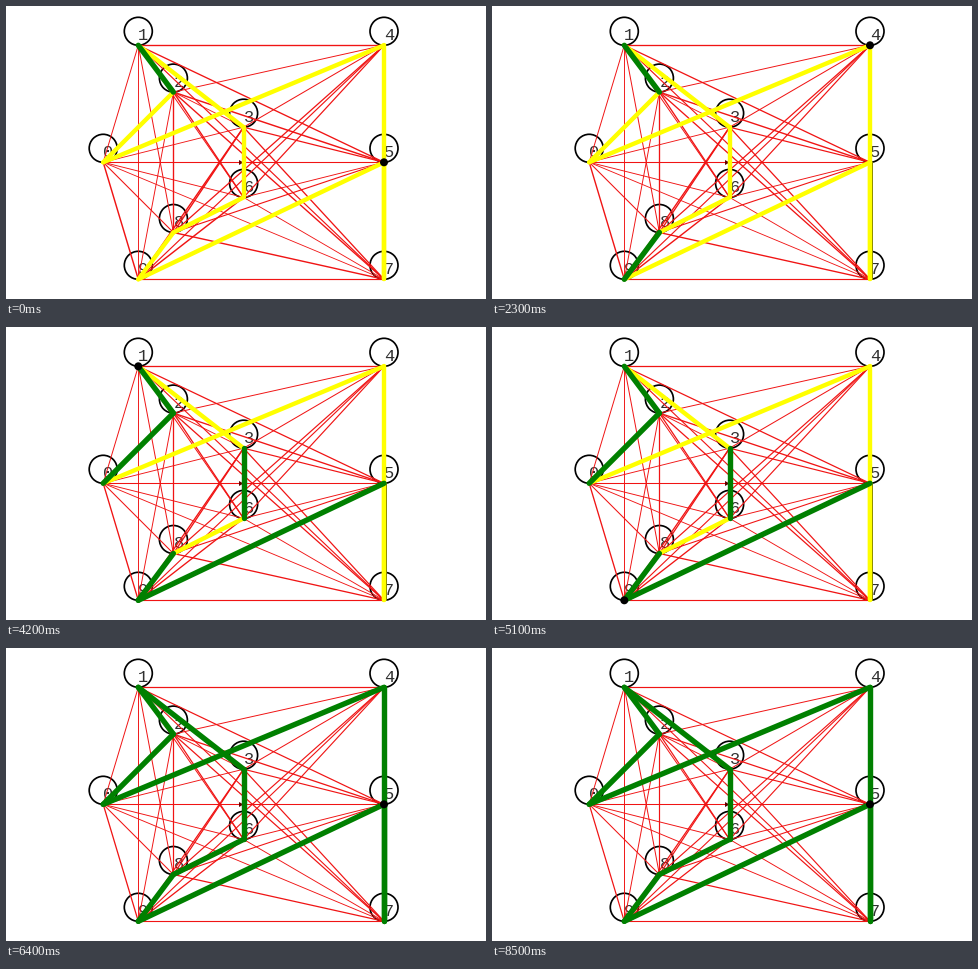
A matplotlib script for the animation above (8600 ms loop, 480 by 293 pixels).

```python
from itertools import combinations
import random

import matplotlib.pyplot as plt
from matplotlib.animation import FuncAnimation
from matplotlib.patches import Circle, Polygon

W, H, DPI = 480, 293, 64
FRAMES, STEP_MS = 86, 100
PX = 72 / DPI  # points per pixel

RED, YELLOW, GREEN = "#f01414", "#ffff00", "#008000"
UNIT, LEFT, MIDDLE, R = 35.1, 97.2, 156.3, 14
TOP = 10 / 3
GRID = [(0, 0), (1, -TOP), (2, -2), (4, -1), (8, -TOP),
        (8, 0), (4, 1), (8, TOP), (2, 2), (1, TOP)]
NODES = [(LEFT + UNIT * gx, MIDDLE + UNIT * gy) for gx, gy in GRID]

TOUR = [0, 4, 7, 5, 9, 8, 6, 3, 1, 2]
STARTS = [3, 0, 8, 3, 6, 3, 9, 2, 8]  # tour index where each ant sets out

# Every 20 frames another batch of tour edges turns strong.
BATCHES = ["12", "89", "02 36 59", "04 47 57 13 68"]
STRONG = {(int(a), int(b)): 20 * i
          for i, batch in enumerate(BATCHES) for a, b in batch.split()}

fig = plt.figure(figsize=(W / DPI, H / DPI), dpi=DPI, facecolor="white")
ax = fig.add_axes([0, 0, 1, 1])
ax.set_xlim(0, W)
ax.set_ylim(H, 0)
ax.axis("off")


def edge_line(edge, color, width, z):
    (xa, ya), (xb, yb) = (NODES[i] for i in edge)
    return ax.plot([xa, xb], [ya, yb], color=color, lw=width * PX,
                   solid_capstyle="round", zorder=z)[0]


for i, (x, y) in enumerate(NODES):
    ax.add_patch(Circle((x, y - R), R, fill=False, ec="black", lw=1.7 * PX, zorder=1))
    ax.text(x, y - 5.5, str(i), family="Liberation Mono", size=17 * PX,
            color="#303030", va="baseline", ha="left", zorder=1)

rng = random.Random(4)
weak = [(edge_line(edge, RED, 1, 2), rng.uniform(-0.2, 0.5))
        for edge in combinations(range(10), 2) if edge not in STRONG]
ax.add_patch(Polygon([(233, 154), (237.5, 156.5), (233, 159)], fc="#600000",
                     ec="none", zorder=3))

tour_lines = {edge: edge_line(edge, YELLOW, 4.4, 4) for edge in STRONG}
x5, y5 = NODES[5]
side = ax.plot([x5 + 2] * 2, [y5, NODES[7][1]], color="#909000", lw=PX, zorder=5)[0]
ant = ax.add_patch(Circle(NODES[5], 4, fc="black", ec="none", zorder=8))


def draw(frame):
    kept = 1 - 0.5 * frame / FRAMES
    for line, extra in weak:
        line.set_linewidth((1 + extra * kept) * PX)
    for edge, line in tour_lines.items():
        strong = frame >= STRONG[edge]
        line.set_color(GREEN if strong else YELLOW)
        line.set_linewidth((5.4 if strong else 4.4) * PX)
        line.set_zorder(6 if strong else 4)
    side.set_visible(20 <= frame < STRONG[5, 7])
    trip, hop = divmod(frame, 10)
    ant.center = NODES[TOUR[(STARTS[trip] + hop) % 10]]
    return [*(line for line, _ in weak), *tour_lines.values(), side, ant]


anim = FuncAnimation(fig, draw, frames=FRAMES, interval=STEP_MS,
                     init_func=lambda: draw(0), repeat=True, repeat_delay=0)
plt.show()
```
